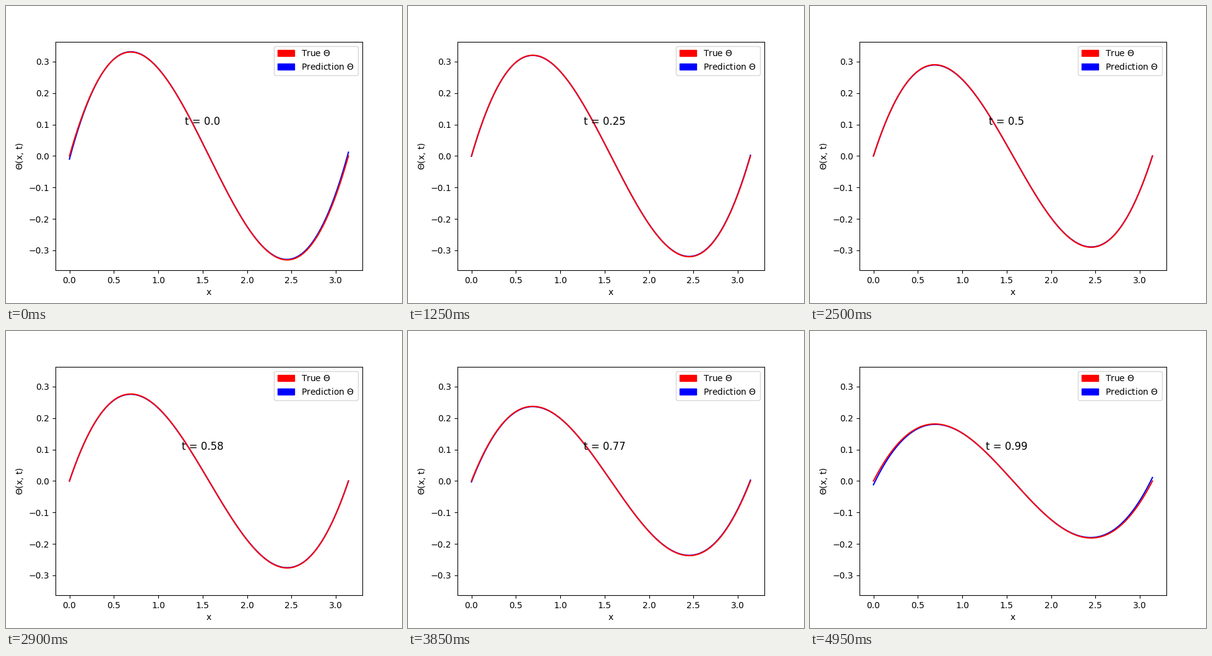
Write a matplotlib script that moves like this. It is 640 px wide and 480 px high and loops after 5 s.

```python
import numpy as np
import matplotlib.pyplot as plt
from matplotlib.animation import FuncAnimation
from matplotlib.patches import Patch

FRAMES = 100
INTERVAL = 50

x = np.linspace(0, np.pi, 200)


def true_theta(t):
    return np.cos(t) * (x - np.pi / 2 + np.pi / 2 * np.cos(x))


def ramp(v):
    return max(v, 0.0) ** 2


def predicted_theta(t):
    """Exact solution plus a small error that grows at the ends of x and t."""
    late = ramp((t - 0.55) / 0.44)
    left_early = -0.010 * ramp(1 - t / 0.35) * (1 - x / 0.4) * np.exp(-x / 0.3)
    left_late = -0.012 * late * np.exp(-x / 0.3)
    right = (0.012 * ramp(1 - t / 0.45) + 0.011 * late) * np.exp((x - np.pi) / 0.35)
    inner = -0.0008 * np.sin(np.pi * t) * np.sin(2 * x)
    return true_theta(t) + left_early + left_late + right + inner


fig, ax = plt.subplots(figsize=(6.4, 4.8), dpi=100)
pred_line, = ax.plot(x, predicted_theta(0), color="blue")
true_line, = ax.plot(x, true_theta(0), color="red")
label = ax.text(1.5, 0.1, "", fontsize=12, ha="center")

ax.set_xlabel("x")
ax.set_ylabel(r"$\Theta$(x, t)")
ax.legend(
    handles=[
        Patch(color="red", label=r"True $\Theta$"),
        Patch(color="blue", label=r"Prediction $\Theta$"),
    ],
    loc="upper right",
)
y_max = 1.1 * true_theta(0).max()
ax.set_ylim(-y_max, y_max)


def update(i):
    t = round(i / FRAMES, 2)
    pred_line.set_ydata(predicted_theta(t))
    true_line.set_ydata(true_theta(t))
    label.set_text(f"t = {t}")
    return pred_line, true_line, label


anim = FuncAnimation(fig, update, frames=FRAMES, interval=INTERVAL,
                     repeat=True, repeat_delay=0)
plt.show()
```
